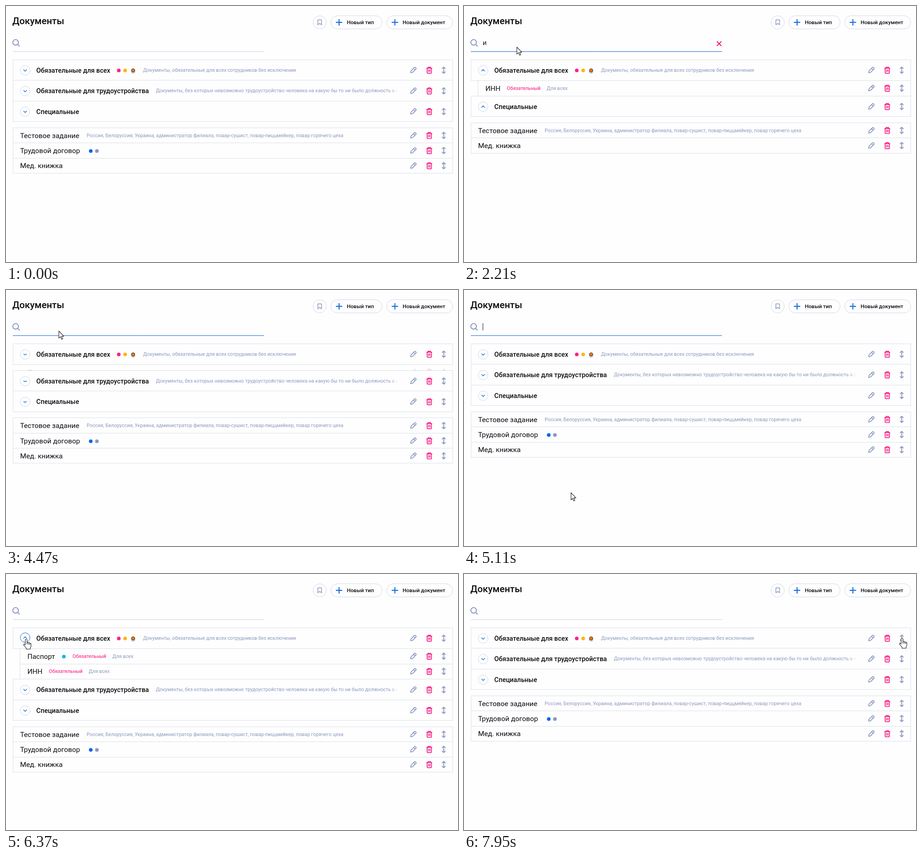
Animation, 992 px wide and 564 px high, one loop 7990 ms. Source, as an HTML page with a canvas:

```html
<!DOCTYPE html>
<html lang="ru">
<head>
<meta charset="utf-8">
<title>Документы</title>
<style>
html, body { margin: 0; width: 100%; height: 100%; overflow: hidden; background: #fefefe; }
canvas { display: block; }
</style>
</head>
<body>
<canvas id="stage" width="992" height="564"></canvas>
<script>
const ctx = document.getElementById('stage').getContext('2d');
const LOOP = 7990;
const INK = '#0b0b10', GREY = '#8b98bf', LINE = '#dcdfec', BLUE = '#0a62e4', PINK = '#f5157f', BG = '#fefefe';
const HEADER = 45.5, DOC = 33.33, CHILD = 33.5, SEAM = 1, GAP = 13.7;

const groups = [
  { name: 'Обязательные для всех', noteX: 301, note: 'Документы, обязательные для всех сотрудников без исключения',
    dots: [[247.5, '#ff1f8b'], [261.5, '#fdb515'], [279, '#f07f1a', true]],
    children: [{ name: 'Паспорт', tagX: 146, dots: [[127, '#14b4f5']] }, { name: 'ИНН', tagX: 94 }] },
  { name: 'Обязательные для трудоустройства', noteX: 329,
    note: 'Документы, без которых невозможно трудоустройство человека на какую бы то ни было должность в компании' },
  { name: 'Специальные' }
];
const docs = [
  { name: 'Тестовое задание', noteX: 177,
    note: 'Россия, Белоруссия, Украина, администратор филиала, повар-сушист, повар-пиццмейкер, повар горячего цеха' },
  { name: 'Трудовой договор', dots: [[186, '#0566f0'], [199.5, GREY]] },
  { name: 'Мед. книжка' }
];

// Timeline, ms
const queries = [[0, ''], [1700, 'и'], [2410, 'ин'], [2670, 'инн'], [3850, 'ин'], [4050, 'и'], [4250, '']];
const caretOn = [[1310, 2210], [2410, 3180], [3720, 4250], [4770, 5190]];
const clicks = [[1310, 116, 90], [5180, 238, 457], [6040, 42, 141], [6710, 42, 141]];
const cursorPath = [
  [110, 577, 541], [640, 95, 95], [810, 95, 95], [950, 95, 78], [1150, 95, 78], [1300, 115.5, 90],
  [4770, 115.5, 90], [5150, 238, 457], [5400, 238, 457], [5960, 44, 143],
  [7000, 44, 143], [7530, 812, 203], [7950, 961, 141]
];

const clamp = v => Math.min(1, Math.max(0, v));
const ramp = (t, from, to) => { const p = clamp((t - from) / (to - from)); return p * p * (3 - 2 * p); };
const within = (t, [from, to]) => t >= from && t < to;
const crisp = y => Math.floor(y) + 0.5;

function text(str, x, cy, size, color = INK, weight = 400) {
  ctx.font = `${weight} ${size}px Roboto, "Open Sans", sans-serif`;
  ctx.fillStyle = color;
  ctx.fillText(str, x, Math.round(cy + size * 0.35));
}

function stroke(path, color, width = 1, fill) {
  const p = new Path2D(path);
  if (fill) { ctx.fillStyle = fill; ctx.fill(p); }
  ctx.strokeStyle = color;
  ctx.lineWidth = width;
  ctx.stroke(p);
}

function disc(x, y, r, fill, outline) {
  ctx.beginPath();
  ctx.arc(x, y, r, 0, 7);
  if (fill) { ctx.fillStyle = fill; ctx.fill(); }
  if (outline) { ctx.strokeStyle = outline; ctx.lineWidth = 1; ctx.stroke(); }
}

function at(x, y, draw) {
  ctx.save();
  ctx.translate(x, y);
  draw();
  ctx.restore();
}

const hline = (x1, x2, y, color = LINE) => stroke(`M${x1} ${crisp(y)}H${x2}`, color);
const frame = (x, top, bottom) => stroke(`M${x} ${crisp(top)}V${crisp(bottom)}M980.5 ${crisp(top)}V${crisp(bottom)}`, LINE);

function rowIcons(cy) {
  at(893.8, cy - 0.2, () => {
    ctx.rotate(Math.PI / 4);
    stroke('M-2.4 -6Q-2.4 -7.6 -0.8 -7.6H0.8Q2.4 -7.6 2.4 -6V4.5L0 8.2L-2.4 4.5ZM-2.4 -3.5H2.4', GREY, 1.7);
  });
  at(929, cy, () => stroke('M-6.3 -4.5H6.3M-2.8 -4.5V-6.7H2.8V-4.5M-4.7 -4.5V5Q-4.7 6.7 -3 6.7H3Q4.7 6.7 4.7 5V-4.5M-1.5 -1.7V3.7M1.5 -1.7V3.7', PINK, 1.7));
  at(960.7, cy - 0.2, () => stroke('M0 -6.5V6.5M-3.8 -3.3L0 -7L3.8 -3.3M-3.8 3.3L0 7L3.8 3.3', GREY, 1.9));
}

function rowDots(dots = [], cy) {
  for (const [x, color, ringed] of dots) {
    if (ringed) disc(x, cy + 2.5, 4.8, 'rgba(90,100,130,.3)');
    disc(x, cy, ringed ? 3.7 : 4, color, ringed && '#1c1c20');
  }
}

function rowNote({ note, noteX }, cy) {
  if (!note) return;
  ctx.save();
  ctx.beginPath();
  ctx.rect(noteX, cy - 12, 861 - noteX, 24);
  ctx.clip();
  text(note, noteX, cy - 0.5, 10.8, GREY);
  const fade = ctx.createLinearGradient(840, 0, 861, 0);
  fade.addColorStop(0, 'rgba(254,254,254,0)');
  fade.addColorStop(1, BG);
  ctx.fillStyle = fade;
  ctx.fillRect(840, cy - 12, 21, 24);
  ctx.restore();
}

function chevron(cy, open, hover) {
  const y = cy + 0.3 - hover * 1.7;
  disc(42, y, 10.5, '#fff', hover ? '#1f62b5' : '#cfd5e6');
  const bend = 1.9 * (1 - 2 * open);
  stroke(`M38.4 ${y - bend}L42 ${y + bend}L45.6 ${y - bend}`, '#1a6fdd', 1.4);
}

function drawChildren(children, top, open) {
  const height = (children.length * CHILD + SEAM) * open;
  ctx.save();
  ctx.beginPath();
  ctx.rect(0, top + SEAM, 992, height);
  ctx.clip();
  ctx.globalAlpha = open;
  frame(30.5, top, top + height);
  children.forEach((child, i) => {
    const rowTop = top + SEAM + i * CHILD, cy = rowTop + 16.5;
    text(child.name, 47, cy, 15.4);
    rowDots(child.dots, cy + 0.7);
    text('Обязательный', child.tagX, cy, 10.8, PINK);
    text('Для всех', child.tagX + 87.5, cy, 10.8, GREY);
    rowIcons(cy);
    hline(30, 981, rowTop + CHILD);
  });
  ctx.restore();
  return height;
}

function drawList(t, query, hover) {
  const searchOpen = ramp(t, 1700, 1910) - ramp(t, 4250, 4560);
  const firstOpen = searchOpen + ramp(t, 6180, 6370) - ramp(t, 6760, 7070);
  const matches = item => item.name.toLowerCase().includes(query);
  let y = 118.2;

  groups.forEach((group, i) => {
    const children = (group.children || []).filter(matches);
    if (!matches(group) && !children.length) return;
    const open = i ? searchOpen : firstOpen, cy = y + 23.4;
    const expanded = children.length && open > 0;
    hline(15, 981, y);
    frame(15.5, y, y + HEADER);
    chevron(cy, open, !i && hover);
    text(group.name, 66.5, cy, 14.4, INK, 500);
    rowDots(group.dots, cy + 0.3);
    rowNote(group, cy);
    rowIcons(cy);
    y += HEADER;
    hline(15, 981, expanded ? y + SEAM : y);
    if (expanded) y += drawChildren(children, y, open);
  });

  y += GAP;
  docs.filter(matches).forEach((doc, i) => {
    const cy = y + 16.9;
    if (!i) hline(15, 981, y);
    frame(15.5, y, y + DOC);
    text(doc.name, 31, cy, 15.4);
    rowDots(doc.dots, cy + 0.9);
    rowNote(doc, cy);
    rowIcons(cy);
    y += DOC;
    hline(15, 981, y);
  });
}

function pill(x, width, label) {
  ctx.beginPath();
  ctx.roundRect(x, 21.5, width, 29, 14.5);
  ctx.strokeStyle = '#d3d7e6';
  ctx.lineWidth = 1;
  ctx.stroke();
  stroke(`M${x + 11} 36H${x + 25}M${x + 18} 29V43`, BLUE, 2);
  text(label, x + 35, 36, 11.6, INK, 500);
}

function drawTop() {
  text('Документы', 14, 33, 20.6, INK, 500);
  disc(688.5, 36, 14.5, null, '#d3d7e6');
  stroke('M684.5 30.5H692.5V41.5L688.5 38.3L684.5 41.5Z', GREY, 1.5);
  pill(713, 112.5, 'Новый тип');
  pill(835.5, 145, 'Новый документ');
}

function drawSearch(t, query) {
  stroke('M27.2 80.2A6.1 6.1 0 1 1 15 80.2A6.1 6.1 0 1 1 27.2 80.2M25.5 84.6L30 89', GREY, 2);
  hline(15, 566, 100, '#c9cee0');
  ctx.globalAlpha = ramp(t, 1310, 1460) - ramp(t, 5190, 5340);
  hline(15, 566, 100, BLUE);
  ctx.globalAlpha = 1;
  text(query, 41, 81, 15, '#1c1c20');
  const end = 41 + ctx.measureText(query).width;
  if (within(t, [3720, 3850])) {
    ctx.setLineDash([2, 1.5]);
    stroke(`M41 88.5H${end}`, '#c8384a', 1.2);
    ctx.setLineDash([]);
  }
  if (caretOn.some(span => within(t, span))) stroke(`M${crisp(end)} 73V89`, '#111');
  if (query) stroke('M555 78L565 88M565 78L555 88', PINK, 2);
}

function cursorAt(t) {
  const next = cursorPath.findIndex(key => key[0] > t);
  if (next < 0) return cursorPath.at(-1).slice(1);
  if (!next) return null;
  const [t0, x0, y0] = cursorPath[next - 1], [t1, x1, y1] = cursorPath[next];
  const p = ramp(t, t0, t1);
  return [x0 + (x1 - x0) * p, y0 + (y1 - y0) * p];
}

function drawCursor(x, y, pointing) {
  at(x, y, () => stroke(pointing
    ? 'M-1.6 1.8Q0.3 -1.2 2.2 1.8V8Q4.2 6.8 5.3 8.6Q7.2 7.6 8.3 9.4Q11 9 11 11.5V15Q11 17.5 9.3 19.5V22.5H0.3V20L-5.2 13.6Q-5.6 10.8 -3.2 11.6L-1.6 13.2ZM2.2 8V12M5.3 9V12.5M8.3 10V13'
    : 'M0.5 0.5V16.2L4 12.9L6.5 18.5L9 17.4L6.5 11.9H11.3Z', '#1a1a24', 1.1, '#fff'));
}

function render(now) {
  const t = now % LOOP;
  const query = queries.findLast(q => t >= q[0])[1];
  const cursor = cursorAt(t);
  const onChevron = !!cursor && Math.hypot(cursor[0] - 42, cursor[1] - 142) < 12;
  const onIcons = !!cursor && cursor[0] > 886 && cursor[1] < 200;

  ctx.fillStyle = BG;
  ctx.fillRect(0, 0, 992, 564);
  drawTop();
  drawSearch(t, query);
  drawList(t, query, onChevron);
  for (const [start, x, y] of clicks) {
    const p = (t - start) / 170;
    if (p >= 0 && p < 1) disc(x, y, 11, `rgba(255,240,40,${0.75 * (1 - p * p)})`);
  }
  if (cursor) drawCursor(...cursor, onChevron || onIcons);
  requestAnimationFrame(render);
}
ctx.lineJoin = 'round';
requestAnimationFrame(render);
</script>
</body>
</html>
```
